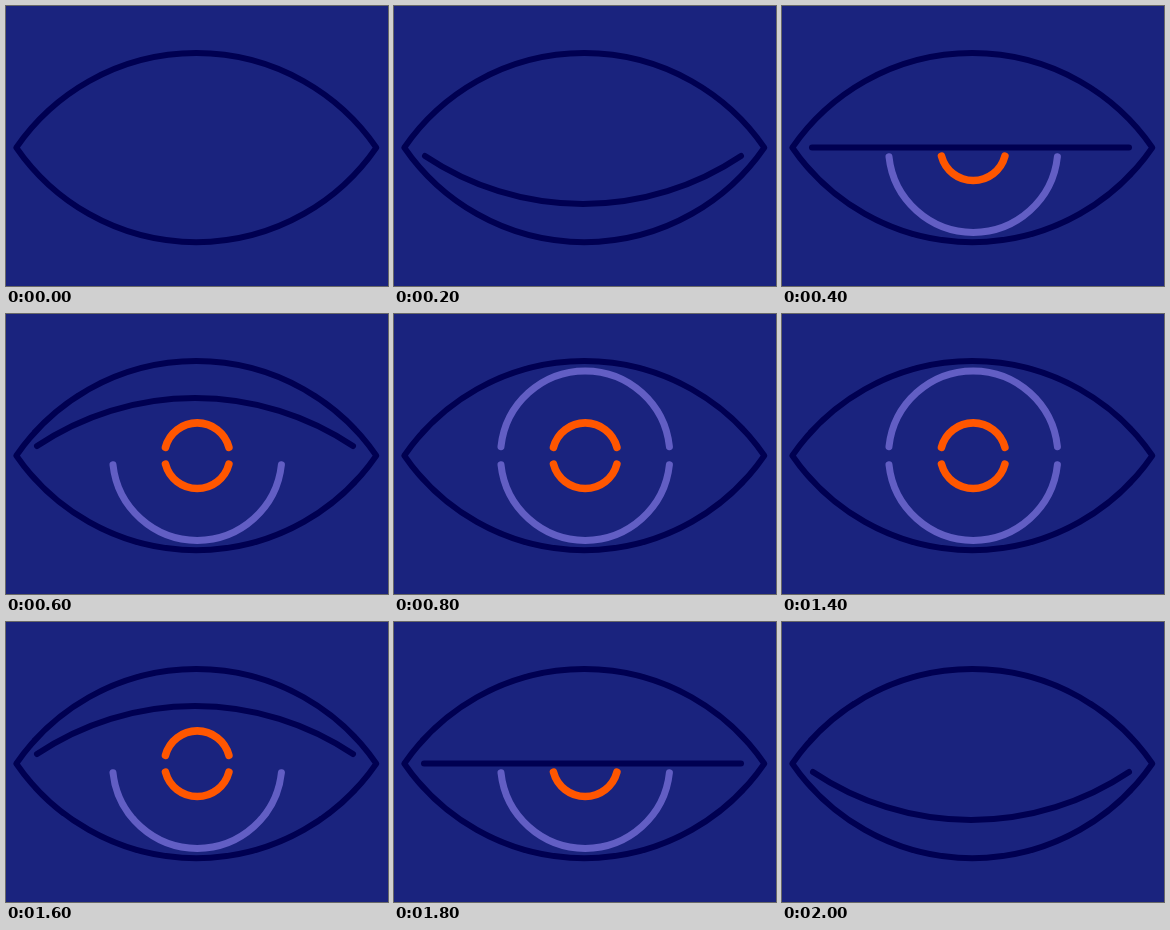
Recreate the animation shown at these times as an HTML page. Size 382 px wide and 280 px high, loop 2200 ms.

```html
<!DOCTYPE html>
<html lang="en">
<head>
<meta charset="utf-8">
<title>Eye</title>
<style>
  html, body { margin: 0; width: 100%; height: 100%; overflow: hidden; background: #1a237e; }
  svg { display: block; width: 100%; height: 100%; }
  path { fill: none; stroke-linecap: round; stroke-linejoin: round; }
  .dark { stroke: #000051; stroke-width: 6; }
  .iris { stroke: #625ec4; stroke-width: 7; }
  .pupil { stroke: #ff5600; stroke-width: 7.6; }
</style>
</head>
<body>
<svg viewBox="0 0 382 280">
  <path class="dark" d="M10.3 141.6A218.6 218.6 0 0 1 370.3 141.6A218.6 218.6 0 0 1 10.3 141.6Z"/>
  <path class="iris" id="irisTop"/>
  <path class="iris" id="irisBottom"/>
  <g id="pupil">
    <path class="pupil" id="pupilTop"/>
    <path class="pupil" id="pupilBottom"/>
  </g>
  <path class="dark" id="lid"/>
</svg>
<script>
const $ = id => document.getElementById(id);
const STEP = 200;
const CX = 191.2, CY = 141.7;

// Half ring around the eye centre; side is -1 for the top, 1 for the bottom.
function halfRing(r, gap, side) {
  const dx = Math.sqrt(r * r - gap * gap);
  const y = CY + side * gap;
  return `M${CX - dx} ${y}A${r} ${r} 0 0 ${side < 0 ? 1 : 0} ${CX + dx} ${y}`;
}

for (const [name, r, gap] of [["iris", 84.7, 9], ["pupil", 32.8, 8.4]]) {
  $(name + "Top").setAttribute("d", halfRing(r, gap, -1));
  $(name + "Bottom").setAttribute("d", halfRing(r, gap, 1));
}

const LIDS = {
  low: "M31 150A284 284 0 0 0 347 150",
  mid: "M30 141.5H347",
  high: "M31 132A284 284 0 0 1 347 132"
};

const shut = {};
const low = { lid: "low" };
const mid = { lid: "mid", show: ["irisBottom", "pupilBottom"] };
const high = { lid: "high", show: ["irisBottom", "pupilBottom", "pupilTop"] };
const open = { show: ["irisBottom", "pupilBottom", "pupilTop", "irisTop"] };
const turn = (angle, shift) => ({ ...open, angle, shift });

const poses = [shut, low, mid, high, open, turn(30, 0.6), turn(-30, 1.8), open, high, mid, low];
const parts = ["irisTop", "irisBottom", "pupilTop", "pupilBottom"];

function draw(time) {
  const index = Math.floor(time / STEP) % poses.length;
  const { lid, show = [], angle = 0, shift = 0 } = poses[index];
  for (const id of parts) $(id).style.display = show.includes(id) ? "" : "none";
  $("lid").setAttribute("d", lid ? LIDS[lid] : "");
  $("pupil").setAttribute("transform", `translate(${shift} 0) rotate(${angle} ${CX} ${CY})`);
}

const start = performance.now();
function tick() {
  draw(performance.now() - start);
  requestAnimationFrame(tick);
}
tick();
</script>
</body>
</html>
```
